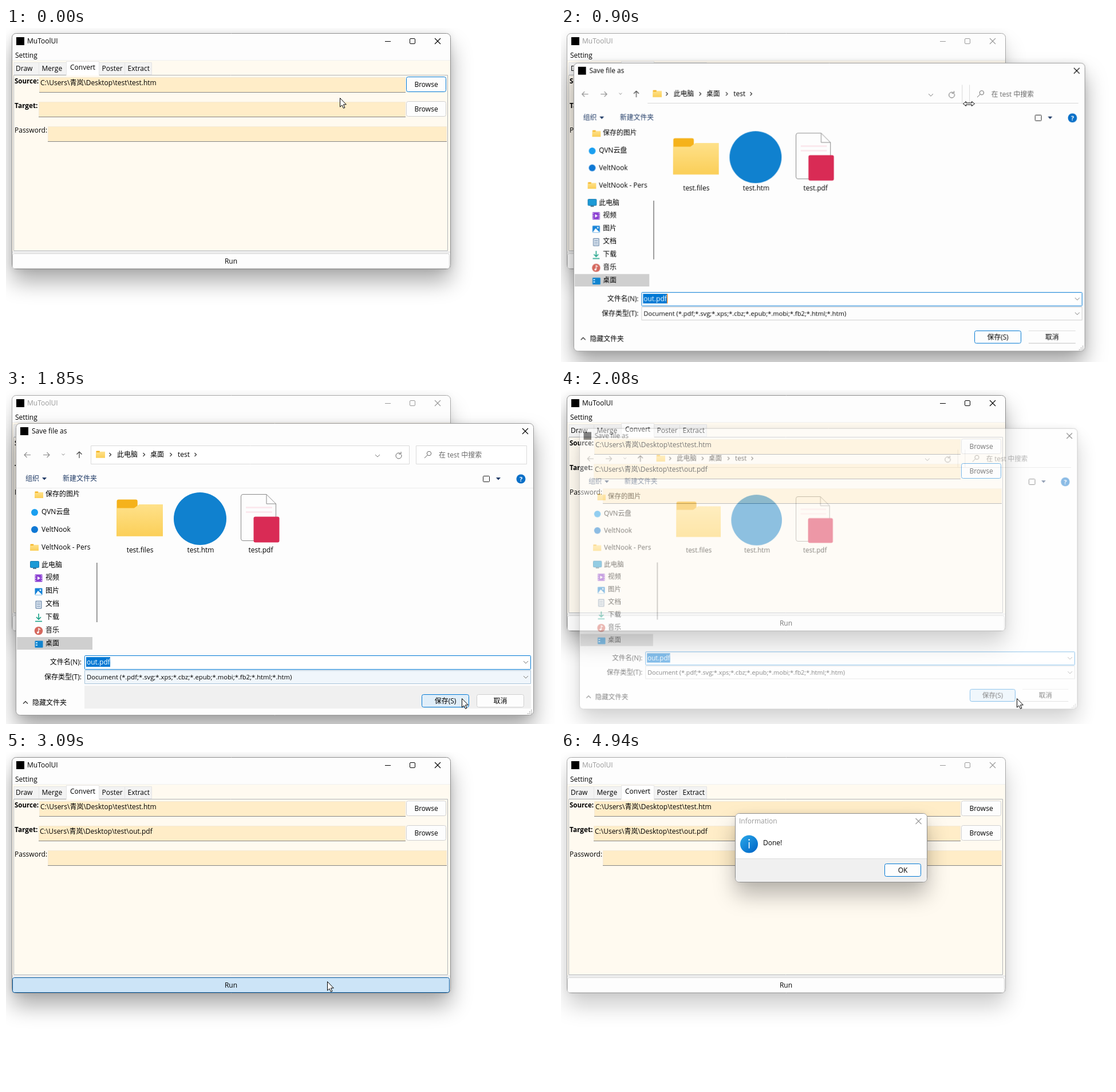
An HTML page with a canvas that plays this animation: 959 px wide and 584 px high, repeating every 5 s.

```html
<!DOCTYPE html>
<html lang="zh-CN">
<head>
<meta charset="utf-8">
<title>Convert demo</title>
<style>
html, body { margin: 0; width: 100%; height: 100%; overflow: hidden; background: #fff; }
canvas { display: block; }
</style>
</head>
<body>
<canvas id="stage" width="959" height="584"></canvas>
<script>
const W = 959, H = 584, PAD = 70, LOOP = 5000;
const OPEN = 780, CLOSE = 1980, INFO = 3210;
const BLUE = '#0078d4', INK = '#000';
const screen = document.getElementById('stage').getContext('2d');
const layer = document.createElement('canvas');
layer.width = W + 2 * PAD;
layer.height = H + 2 * PAD;
const layerCtx = layer.getContext('2d');
let g = screen;

// Pointer keys: time, x, y
const PATH = [
  [30, 583, 122], [180, 620, 115], [300, 660, 113], [420, 695, 124], [550, 712, 132],
  [950, 712, 132], [1040, 715, 160], [1130, 722, 201], [1250, 737, 300], [1350, 757, 373],
  [1430, 772, 417], [1560, 790, 510], [1650, 796, 539],
  [2200, 796, 539], [2300, 755, 495], [2480, 640, 395], [2620, 580, 345], [2740, 573, 352],
  [2900, 561, 401], [3930, 561, 401], [4060, 620, 425], [4220, 775, 515], [4350, 875, 588]
];

const clamp = v => Math.max(0, Math.min(1, v));
const easeOut = p => 1 - (1 - p) ** 3;

function pointerAt(t) {
  if (t <= PATH[0][0]) return { x: PATH[0][1], y: PATH[0][2] };
  for (let i = 1; i < PATH.length; i++) {
    const [t0, x0, y0] = PATH[i - 1], [t1, x1, y1] = PATH[i];
    if (t <= t1) {
      const p = (t - t0) / (t1 - t0);
      return { x: Math.round(x0 + (x1 - x0) * p), y: Math.round(y0 + (y1 - y0) * p) };
    }
  }
  return null;
}

const inside = (p, x, y, w, h) => p && p.x >= x && p.x < x + w && p.y >= y && p.y < y + h;

function rect(x, y, w, h, fill) {
  g.fillStyle = fill;
  g.fillRect(x, y, w, h);
}

function box(x, y, w, h, r, fill, stroke) {
  g.beginPath();
  g.roundRect(x + .5, y + .5, w - 1, h - 1, r);
  if (fill) { g.fillStyle = fill; g.fill(); }
  if (stroke) { g.strokeStyle = stroke; g.lineWidth = 1; g.stroke(); }
}

function disc(x, y, r, fill) {
  g.beginPath();
  g.arc(x, y, r, 0, 7);
  g.fillStyle = fill;
  g.fill();
}

function line(color, width, ...pts) {
  g.beginPath();
  for (let i = 0; i < pts.length; i += 2) g.lineTo(pts[i], pts[i + 1]);
  g.strokeStyle = color;
  g.lineWidth = width;
  g.stroke();
}

function shape(fill, ...pts) {
  g.beginPath();
  for (let i = 0; i < pts.length; i += 2) g.lineTo(pts[i], pts[i + 1]);
  g.closePath();
  g.fillStyle = fill;
  g.fill();
}

// y is the middle of the capitals
function text(s, x, y, color = INK, align = 'left', size = 12, weight = 400) {
  g.font = `${weight} ${size}px "Open Sans","Noto Sans CJK SC","Noto Sans CJK JP","Noto Sans CJK",sans-serif`;
  g.textAlign = align;
  g.fillStyle = color;
  g.fillText(s, x, y + 4);
}

function cross(x, y, color) {
  line(color, 1.1, x - 5, y - 5, x + 5, y + 5);
  line(color, 1.1, x - 5, y + 5, x + 5, y - 5);
}

const chevronDown = (x, y, color = '#777') => line(color, 1, x - 4, y - 2, x, y + 2, x + 4, y - 2);
const chevronRight = (x, y) => line('#333', 1.2, x - 1.5, y - 3, x + 1.5, y, x - 1.5, y + 3);
const triangle = (x, y) => shape('#1f3a66', x - 4, y - 2, x + 4, y - 2, x, y + 2.5);

function frame(x, y, w, h, strength, border) {
  g.save();
  g.shadowColor = `rgba(0,0,0,${strength})`;
  g.shadowBlur = 38;
  g.shadowOffsetY = 22;
  box(x, y, w, h, 7, '#fff');
  g.shadowColor = `rgba(0,0,0,${strength * .3})`;
  g.shadowBlur = 14;
  g.shadowOffsetY = 0;
  box(x, y, w, h, 7, '#fff');
  g.restore();
  box(x, y, w, h, 7, '#fdfdfd', border);
}

function button(label, x, y, w, h, state) {
  const look = {
    idle: ['#fdfdfd', '#d0d0d0'], focus: ['#fdfdfd', BLUE],
    hover: ['#e0eef9', BLUE], down: ['#cce4f7', '#005499']
  }[state];
  box(x, y, w, h, 3, look[0], look[1]);
  text(label, x + w / 2, y + h / 2, INK, 'center');
}

function field(x, y, w) {
  rect(x, y, w, 27, '#f4ead6');
  rect(x + 1, y + 1, w - 2, 25, '#ffedc8');
  rect(x, y + 26, w, 1, '#858585');
}

function drawMain(t, p) {
  const active = t < OPEN || (t >= CLOSE && t < INFO);
  const ink = active ? INK : '#999';
  frame(10, 9, 767, 413, active ? .33 : .2, active ? '#8e8e8e' : '#a8a8a8');
  rect(18, 16, 14, 14, '#000');
  text('MuToolUI', 37, 23, ink);
  line(ink, 1, 662, 23.5, 672, 23.5);
  box(705, 18, 10, 10, 1.5, null, ink);
  cross(754, 23, ink);
  text('Setting', 16, 48);

  rect(11, 56, 765, 1, '#f0f0f0');
  rect(11, 57, 765, 334, '#fffaf0');
  rect(11, 390, 765, 1, '#fff');
  rect(11, 391, 765, 1, '#dcdcdc');
  rect(11, 392, 765, 2, '#f3f3f3');
  for (const [name, x, w] of [['Draw', 13, 45], ['Merge', 57, 49], ['Poster', 162, 46], ['Extract', 207, 48]]) {
    box(x, 60, w, 22, 0, '#f3f3f3', '#e4e4e4');
    text(name, x + (x === 13 ? 4 : 5.5), 71);
  }
  box(13, 82, 759, 308, 0, '#fffaf0', '#b0b4b8');
  rect(105, 58, 58, 25, '#e6e6e6');
  rect(106, 59, 56, 24, '#fff');
  text('Convert', 112, 69);

  field(58, 86, 640);
  field(57, 129, 641);
  field(73, 172, 697);
  text('Source:', 15, 93, INK, 'left', 11.5, 700);
  text('Target:', 15, 136, INK, 'left', 11.8, 700);
  text('Password:', 15, 179);
  const home = 'C:\\Users\\青岚\\Desktop\\test\\';
  text(home + 'test.htm', 60, 96);
  if (t >= CLOSE) text(home + 'out.pdf', 59, 139);

  let target = 'idle';
  if (t < 580 && inside(p, 700, 128, 70, 28)) target = 'hover';
  else if (t >= 580 && t < 700) target = 'down';
  else if (t >= 700 && t < 3000) target = 'focus';
  button('Browse', 699, 85, 70, 27, t < 580 ? 'focus' : 'idle');
  button('Browse', 699, 128, 70, 27, target);

  let run = 'idle';
  if (t >= 3000 && t < INFO) run = 'down';
  else if (t >= CLOSE && t < INFO && inside(p, 11, 394, 764, 27)) run = 'hover';
  button('Run', 11, 394, 764, 27, run);
}

function folder(x, y, s) {
  const c = g.createLinearGradient(0, y, 0, y + s * .8);
  c.addColorStop(0, '#ffe492');
  c.addColorStop(1, '#fbcf58');
  box(x, y, s * .46, s * .4, s * .04, '#f5b21b');
  shape(c, x, y + s * .19, x + s * .38, y + s * .19, x + s * .49, y + s * .11,
    x + s, y + s * .11, x + s, y + s * .8, x, y + s * .8);
}

function placeIcon(kind, x, y) {
  if (kind === 'video') {
    box(x, y, 14, 14, 1, '#8a3fd1');
    shape('#fff', x + 5, y + 4, x + 10, y + 7, x + 5, y + 10);
    for (let i = 2; i < 12; i += 4) {
      rect(x + 1, y + i, 1.5, 2, '#d8b8f5');
      rect(x + 11.5, y + i, 1.5, 2, '#d8b8f5');
    }
  } else if (kind === 'image') {
    box(x, y + 1, 14, 13, 1, '#1683d8');
    shape('#fff', x + 1, y + 13, x + 6, y + 6, x + 13, y + 13);
    disc(x + 10, y + 5, 1.4, '#fff');
  } else if (kind === 'doc') {
    box(x + 1, y, 12, 15, 1, '#7e97b5');
    rect(x + 3, y + 2, 8, 11, '#e4edf6');
    for (let i = 4; i < 12; i += 3) rect(x + 4, y + i, 6, 1, '#6a86a8');
  } else if (kind === 'down') {
    line('#16a085', 1.6, x + 7, y, x + 7, y + 10);
    line('#16a085', 1.6, x + 3, y + 6, x + 7, y + 10, x + 11, y + 6);
    line('#16a085', 1.6, x + 1, y + 13.5, x + 13, y + 13.5);
  } else if (kind === 'music') {
    disc(x + 7, y + 7, 7.3, '#d5695f');
    line('#fff', 1.3, x + 7, y + 10, x + 7, y + 3, x + 10, y + 5);
    disc(x + 5.7, y + 10, 1.8, '#fff');
  } else {
    box(x, y + 1, 15, 13, 1, '#1184cf');
    rect(x + 2, y + 4, 3, 2, '#bfe6ff');
    rect(x + 2, y + 8, 3, 2, '#bfe6ff');
  }
}

function drawNav() {
  folder(50, 177, 15);
  text('保存的图片', 69, 182);
  disc(50, 214, 6, '#1a9ff0');
  text('QVN云盘', 62, 213);
  disc(50, 244, 6, '#0f78d4');
  text('VeltNook', 62, 244);
  folder(42, 269, 15);
  text('VeltNook - Pers', 62, 275);
  box(42, 299, 16, 12, 1, '#1c9ad6', '#1678b0');
  rect(47, 311, 6, 2, '#5b7d92');
  text('此电脑', 62, 306);
  rect(19, 432, 132, 22, '#cfcfcf');
  const kinds = ['video', 'image', 'doc', 'down', 'music', 'desk'];
  ['视频', '图片', '文档', '下载', '音乐', '桌面'].forEach((name, i) => {
    const y = 328 + i * 23;
    placeIcon(kinds[i], 50, y - 6);
    text(name, 69, y);
  });
  rect(158, 302, 1.6, 104, '#858585');
}

function drawFiles() {
  folder(193, 191, 81);
  text('test.files', 234, 280, INK, 'center');
  disc(339, 225, 46, '#1081cf');
  text('test.htm', 340, 280, INK, 'center');

  g.beginPath();
  g.moveTo(455, 182.5);
  g.lineTo(414, 182.5);
  g.quadraticCurveTo(410.5, 182.5, 410.5, 186);
  g.lineTo(410.5, 260);
  g.quadraticCurveTo(410.5, 263.5, 414, 263.5);
  g.lineTo(471.5, 263.5);
  g.lineTo(471.5, 199);
  g.lineTo(455, 182.5);
  g.lineTo(455, 199);
  g.lineTo(471.5, 199);
  g.strokeStyle = '#8a8a8a';
  g.lineWidth = 1;
  g.stroke();
  rect(419, 204, 46, 3, '#fbe9ee');
  rect(419, 212, 46, 3, '#fbe9ee');
  box(432, 221, 46, 46, 3, '#d92b55');
  text('test.pdf', 445, 280, INK, 'center');
}

function drawAddress(moving) {
  const grey = '#8c8c8c', dark = '#333';
  line(grey, 1.1, 43, 113.5, 32, 113.5);
  line(grey, 1.1, 36.5, 109, 32, 113.5, 36.5, 118);
  line(grey, 1.1, 65, 113.5, 76, 113.5);
  line(grey, 1.1, 71.5, 109, 76, 113.5, 71.5, 118);
  line(grey, 1, 97.5, 111.5, 100, 114, 102.5, 111.5);
  line(dark, 1.1, 128, 119, 128, 108);
  line(dark, 1.1, 123.5, 112.5, 128, 108, 132.5, 112.5);

  // Hairlines vanish while the window is scaled
  if (moving) {
    rect(148, 129, 762, 1, '#d8d8d8');
    rect(704, 97, 1, 33, '#d8d8d8');
    rect(717, 97, 1, 33, '#d8d8d8');
  } else {
    box(148, 97, 557, 33, 0, '#fff', '#dadada');
    box(716, 97, 194, 33, 0, '#fff', '#dadada');
  }
  folder(157, 106, 16);
  [182, 241, 288, 331].forEach(x => chevronRight(x, 113));
  text('此电脑', 194, 113);
  text('桌面', 252, 113);
  text('test', 300, 113);
  chevronDown(649, 115);
  g.beginPath();
  g.arc(686, 115, 5, -.4, 5.3);
  g.strokeStyle = '#666';
  g.lineWidth = 1;
  g.stroke();
  line('#666', 1, 690, 108, 690, 112, 686, 112);
  g.beginPath();
  g.arc(739, 111, 3.7, 0, 7);
  g.stroke();
  line('#666', 1, 736, 114, 731, 119);
  text('在 test 中搜索', 756, 114, '#666');
}

function drawSave(t, p) {
  const moving = t < 1020 || t >= CLOSE;
  const low = t > 1560 && t < CLOSE;
  frame(17, 58, 905, 511, .36, '#9a9a9a');
  rect(25, 65, 14, 14, '#000');
  text('Save file as', 45, 72);
  cross(907, 72, INK);
  drawAddress(moving);

  text('组织', 34, 155, '#1f3a66');
  triangle(67, 155);
  text('新建文件夹', 99, 155, '#1f3a66');
  box(833, 150, 12, 11, 1, null, '#222');
  triangle(860, 155);
  disc(899.5, 155.5, 8, '#0a70c8');
  text('?', 899.5, 155.5, '#fff', 'center', 11, 700);
  if (!moving) rect(18, 171, 903, 1, '#ececec');

  drawNav();
  drawFiles();

  text('文件名(N):', 132, 476, INK, 'right');
  box(137, 464, 780, 25, 1, '#fff', BLUE);
  rect(140, 467, 42, 17, BLUE);
  text('out.pdf', 141, 476, '#fff');
  if (t < 1130) rect(182, 467, 1.5, 17, '#f08a30');
  chevronDown(908, 476);
  text('保存类型(T):', 132, 502, INK, 'right');
  box(137, 490, 780, 24, 0, low ? '#f0f6fb' : '#fdfdfd', low ? '#a9c4da' : '#d0d0d0');
  text('Document (*.pdf;*.svg;*.xps;*.cbz;*.epub;*.mobi;*.fb2;*.html;*.htm)', 141, 502, INK, 'left', 11.25);
  chevronDown(908, 502);

  if (low) rect(137, 517, 780, 40, '#f0f0f0');
  line('#333', 1.3, 30, 548.5, 34, 544.5, 38, 548.5);
  text('隐藏文件夹', 46, 547);
  const hot = t >= CLOSE || inside(p, 726, 532, 83, 23);
  button('保存(S)', 726, 532, 83, 23, hot ? 'hover' : 'focus');
  if (moving) {
    rect(822, 532, 83, 1, '#dcdcdc');
    rect(822, 554, 83, 1, '#c4c4c4');
    text('取消', 863.5, 543.5, INK, 'center');
  } else {
    button('取消', 822, 532, 83, 23, 'idle');
  }
  for (let i = 0; i < 3; i++)
    for (let j = 0; j <= i; j++) rect(917 - j * 3, 559 + i * 3, 1.6, 1.6, '#aaa');
}

function drawInfo(t) {
  const active = t < 4930;
  const ink = active ? INK : '#999';
  frame(304, 107, 336, 121, active ? .42 : .28, '#8e8e8e');
  g.save();
  g.beginPath();
  g.roundRect(305, 108, 334, 119, 6);
  g.clip();
  rect(305, 108, 334, 78, '#fff');
  rect(305, 186, 334, 1, '#dfdfdf');
  rect(305, 187, 334, 41, '#f0f0f0');
  g.restore();
  text('Information', 311, 121, ink);
  cross(624.5, 121, ink);
  const c = g.createLinearGradient(316, 148, 340, 175);
  c.addColorStop(0, '#27a3e6');
  c.addColorStop(1, '#0067c8');
  disc(328.5, 161, 15.5, c);
  rect(327.8, 157.5, 1.6, 11, '#fff');
  disc(328.6, 153.5, 1.3, '#fff');
  text('Done!', 353, 159);
  button('OK', 565, 195, 64, 23, 'focus');
}

function drawLayer(paint, cx, cy, scale, alpha) {
  layerCtx.clearRect(0, 0, layer.width, layer.height);
  layerCtx.save();
  layerCtx.translate(PAD, PAD);
  g = layerCtx;
  paint();
  g = screen;
  layerCtx.restore();
  g.save();
  g.globalAlpha = alpha;
  g.translate(cx, cy);
  g.scale(scale, scale);
  g.drawImage(layer, -cx - PAD, -cy - PAD);
  g.restore();
}

function drawPointer(p, resize) {
  g.save();
  g.translate(p.x + .5, p.y + .5);
  g.beginPath();
  const pts = resize
    ? [-10, 0, -5, -4, -5, -1.5, 5, -1.5, 5, -4, 10, 0, 5, 4, 5, 1.5, -5, 1.5, -5, 4]
    : [0, 0, 0, 15.5, 3.5, 12.3, 6, 17.8, 8.4, 16.8, 6, 11.3, 10.8, 11.3];
  for (let i = 0; i < pts.length; i += 2) g.lineTo(pts[i], pts[i + 1]);
  g.closePath();
  g.fillStyle = '#fff';
  g.fill();
  g.strokeStyle = '#000';
  g.lineWidth = 1;
  g.stroke();
  g.restore();
}

function draw(t) {
  const p = pointerAt(t);
  rect(0, 0, W, H, '#fff');
  drawMain(t, p);
  if (t >= OPEN && t < 2170) {
    const gone = clamp((t - CLOSE) / 190);
    const come = easeOut(clamp((t - OPEN) / 240));
    const scale = t < CLOSE ? .9 + .1 * come : 1 - .072 * gone;
    const alpha = t < CLOSE ? clamp((t - OPEN) / 100) : 1 - gone;
    drawLayer(() => drawSave(t, p), 408, 288, scale, alpha);
  }
  if (t >= INFO) {
    const q = clamp((t - INFO) / 240);
    drawLayer(() => drawInfo(t), 471.5, 167.5, .9 + .1 * easeOut(q), clamp(q * 2.4));
  }
  if (p) drawPointer(p, t >= 800 && t < 960);
}

let start = null;
function tick(now) {
  if (start === null) start = now;
  draw((now - start) % LOOP);
  requestAnimationFrame(tick);
}
requestAnimationFrame(tick);
</script>
</body>
</html>
```
